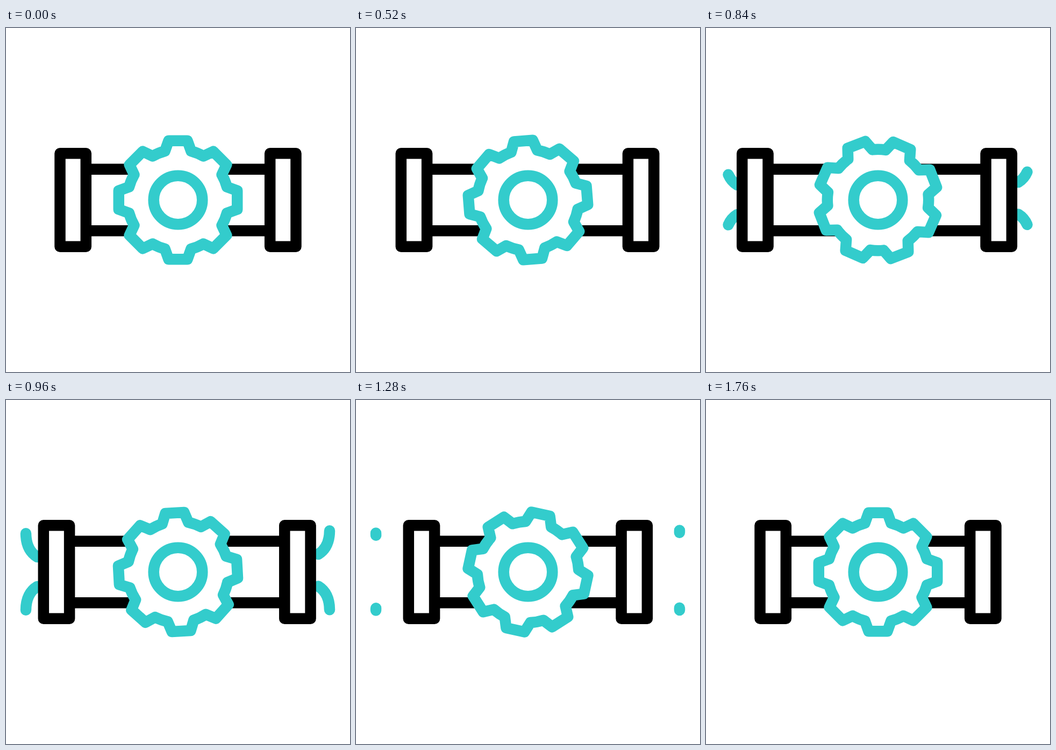
These frames come from a looping animation (640 px wide and 640 px high, 1.88 s). An HTML page:

```html
<!DOCTYPE html>
<html lang="en">
<head>
<meta charset="utf-8">
<title>Valve</title>
<style>
  html, body { margin: 0; width: 100%; height: 100%; overflow: hidden; background: #fff; }
  svg { display: block; width: 100%; height: 100%; }
  svg * { stroke-width: 20.5; stroke-linecap: round; stroke-linejoin: round; }
  .pipe { fill: #fff; stroke: #000; }
  .teal { fill: #fff; stroke: #3cc; }
  .water { fill: none; stroke: #3cc; }
</style>
</head>
<body>
<svg viewBox="0 0 640 640">
  <g id="water"></g>
  <path id="tubes" class="pipe"/>
  <rect id="left" class="pipe" x="100.5" y="233.2" width="48.3" height="173.6"/>
  <rect id="right" class="pipe" x="491.2" y="233.2" width="48.3" height="173.6"/>
  <path id="gear" class="teal"/>
  <circle class="teal" cx="320" cy="320" r="45.3"/>
</svg>
<script>
const LOOP = 1880, STEP = 40;
const $ = id => document.getElementById(id);

// Symmetric ease, equal to cubic-bezier(.6, 0, .4, 1).
function ease(x) {
  let low = 0, high = 1;
  for (let i = 0; i < 30; i++) {
    const s = (low + high) / 2, r = 1 - s;
    if (1.8 * s * r * r + 1.2 * s * s * r + s ** 3 < x) low = s; else high = s;
  }
  const s = (low + high) / 2;
  return s * s * (3 - 2 * s);
}

function progress(t, start, end) {
  if (t <= start) return 0;
  if (t >= end) return 1;
  return ease((t - start) / (end - start));
}

function gearPath() {
  const point = (radius, degrees) => {
    const a = degrees * Math.PI / 180;
    return `${(320 + radius * Math.sin(a)).toFixed(2)} ${(320 - radius * Math.cos(a)).toFixed(2)}`;
  };
  let d = "";
  for (let a = 0; a < 360; a += 45) {
    d += a ? `A94.2 94.2 0 0 1 ${point(94.2, a - 15)}` : `M${point(94.2, -15)}`;
    d += `L${point(111.6, a - 9)}L${point(111.6, a + 9)}L${point(94.2, a + 15)}`;
  }
  return d + `A94.2 94.2 0 0 1 ${point(94.2, -15)}Z`;
}
$("gear").setAttribute("d", gearPath());

// Each jet: start point and the directions in which it bends.
const jets = [[58, 292, -1, -1], [58, 347, -1, 1], [581, 287, 1, -1], [581, 346.5, 1, 1]]
  .map(([x, y, sx, sy]) => {
    const jet = document.createElementNS("http://www.w3.org/2000/svg", "path");
    jet.setAttribute("class", "water");
    jet.setAttribute("d", `M${x} ${y}q${21 * sx} ${13 * sy} ${21 * sx} ${44.5 * sy}`);
    $("water").append(jet);
    return { jet, length: jet.getTotalLength() };
  });

function draw(t) {
  $("gear").setAttribute("transform", `rotate(${360 * progress(t, 40, 1720)} 320 320)`);

  const spread = progress(t, 240, 800) - progress(t, 800, 1440);
  const leftShift = -33.4 * spread, rightShift = 29.5 * spread;
  $("left").setAttribute("transform", `translate(${leftShift} 0)`);
  $("right").setAttribute("transform", `translate(${rightShift} 0)`);
  const from = 148.8 + leftShift, to = 491.2 + rightShift;
  $("tubes").setAttribute("d", `M${from} 262.7H${to}M${from} 377.3H${to}`);

  const tail = progress(t, 1040, 1360), visible = progress(t, 680, 1000) - tail;
  for (const { jet, length } of jets) {
    jet.style.display = visible > 0 ? "" : "none";
    jet.setAttribute("stroke-dasharray", `${visible * length} 500`);
    jet.setAttribute("stroke-dashoffset", -tail * length);
  }
}

const began = performance.now();
function tick() {
  const t = (performance.now() - began) % LOOP;
  draw(Math.floor(t / STEP) * STEP);
  requestAnimationFrame(tick);
}
tick();
</script>
</body>
</html>
```
